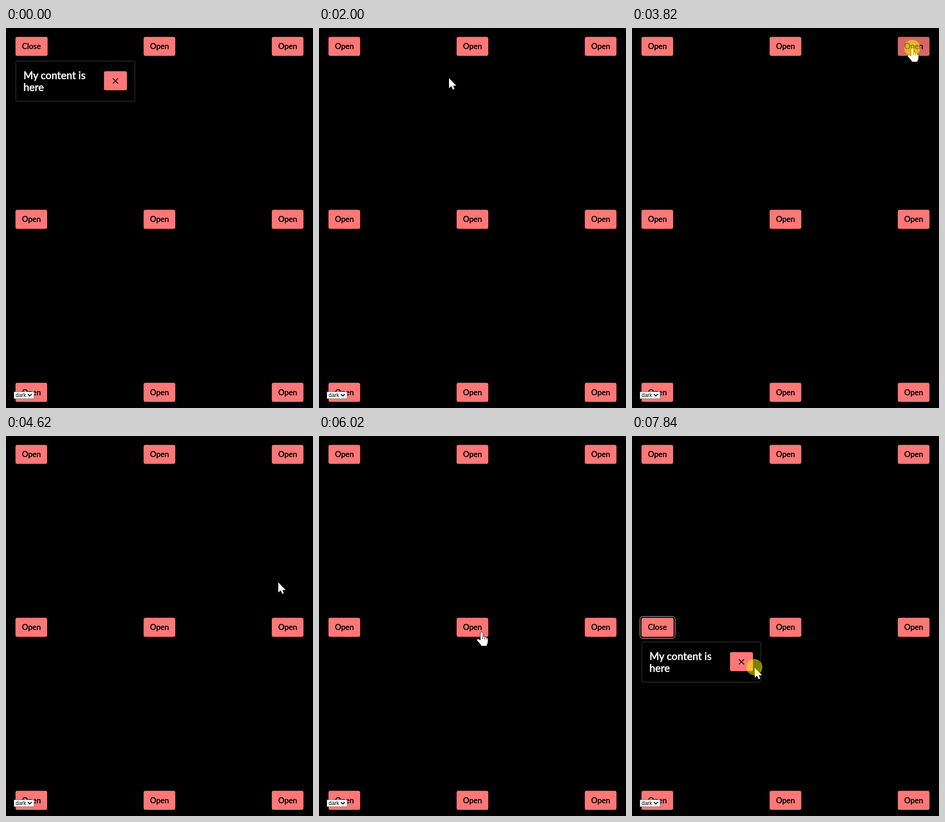
These frames come from a looping animation (673x833 px, 8 s). An HTML page:

```html
<!DOCTYPE html>
<html lang="en">
<head>
<meta charset="utf-8">
<title>Popover grid</title>
<style>
  html, body { margin: 0; width: 100%; height: 100%; overflow: hidden; background: #000; }
  svg { display: block; width: 673px; height: 833px; }
  text { font-family: Lato, sans-serif; font-weight: 500; }
  .label { font-size: 17px; text-anchor: middle; stroke: #000; stroke-width: .4; }
  .heading { font-size: 22.7px; fill: #fff; stroke: #fff; stroke-width: .6; }
  .choice { font: 12px "Liberation Sans", Arial, sans-serif; }
  .button { fill: #ff7777; }
  .ring { fill: none; stroke: #ddd; }
  .panel { fill: #000; stroke: #444; }
  .cursor { fill: #fff; stroke: #000; stroke-width: 1.5; paint-order: stroke; }
  .line { fill: none; stroke: #000; }
</style>
</head>
<body>
<svg id="stage" viewBox="0 0 673 833">
  <g id="grid"></g>
  <g id="select">
    <rect x="17.5" y="797.5" width="44" height="15" fill="#fff" stroke="#767676"/>
    <text class="choice" x="21" y="809">dark</text>
    <path class="line" d="M48 802.5l4.2 4.2 4.2-4.2" stroke-width="2"/>
  </g>
  <g id="popover">
    <rect class="panel" x=".5" y=".5" width="261" height="88" rx="3.5"/>
    <text class="heading" x="17.3" y="40">My content is</text>
    <text class="heading" x="17.3" y="66">here</text>
    <rect class="button" x="193.8" y="22.7" width="50.4" height="41.7" rx="4"/>
    <path class="line" d="M213.3 38.3l11.4 11.4m0-11.4l-11.4 11.4" stroke-width="1.7"/>
  </g>
  <g id="pointer">
    <path id="arrow" class="cursor" d="M0 0V22L5 17.500L8.500 25L12 23.500L9 16.500H16Z"/>
    <g id="hand">
      <path class="cursor" d="M-3 17V2Q-3-1-.5-1T2 2V9Q4.500 7 6.500 10Q9 8.500 10.500 11.500Q13 11 13 14V20Q13 24 10 29H-1Q-3 24-8 20L-11 16Q-9 13-6 15Z"/>
      <path class="line" d="M2 9V14M6.300 10V15M10.300 11.500V15"/>
    </g>
    <path id="beam" d="M-5-10Q0-10 0-7Q0-10 5-10M0-8V8M-5 10Q0 10 0 7Q0 10 5 10" fill="none" stroke="#fff" stroke-width="1.300"/>
    <circle id="click" cx="-.7" cy="-1.300" r="17.700" fill="#ff0" fill-opacity=".5"/>
  </g>
</svg>
<script>
const LOOP = 8000, STEP = 200;
const COLS = [20.8, 301.7, 582.7], ROWS = [19.4, 398.6, 777.7];
const BUTTON = { width: 69.4, height: 41.7 };
const PANEL_X = [21, 302, 390];
const byId = id => document.getElementById(id);
const mix = (a, b, k) => a + (b - a) * k;
const between = (p, q, kx, ky = kx) => [mix(p[0], q[0], kx), mix(p[1], q[1], ky)];

function make(tag, attrs, parent) {
  const node = document.createElementNS(byId('stage').namespaceURI, tag);
  for (const key in attrs) node.setAttribute(key, attrs[key]);
  return parent.appendChild(node);
}

const cells = ROWS.flatMap((y, row) => COLS.map((x, col) => {
  const { width, height } = BUTTON, grid = byId('grid');
  const ring = make('rect', { class: 'ring', x: x - 3.3, y: y - 3.1, height: height + 6.5, rx: 6.5 }, grid);
  const box = make('rect', { class: 'button', x, y, height, rx: 4 }, grid);
  const label = make('text', { class: 'label', x: x + width / 2 + .2, y: y + 26.8 }, grid);
  return { ring, box, label, panel: [PANEL_X[col], Math.round(y + 52.6)] };
}));

// Each visit: press a button, open its popover, click near the cross, move on.
const visits = [
  { start: 0, cell: 0, at: [150, 322] },
  { start: 1400, cell: 0, at: [68, 36], shade: .75, ring: 1 },
  { start: 2600, cell: 1, at: [351, 36], shade: .75, ring: .2 },
  { start: 3820, cell: 2, at: [615, 45], shade: .85, ring: 0, via: [597, 321] },
  { start: 5020, cell: 5, at: [614, 432], shade: .8, ring: .5 },
  { start: 6220, cell: 4, at: [355, 427], shade: .75, ring: .5 },
  { start: 7440, cell: 3, at: [66, 425], shade: .75, ring: 1 }
];

function stateAt(time) {
  const index = visits.findLastIndex(v => time >= v.start);
  const visit = visits[index], next = visits[index + 1] || visit;
  const { cell, at } = visit;
  const target = cells[cell].panel.map((v, i) => v + [248, 57][i]);
  const step = Math.floor((time - visit.start) / STEP);
  const opened = { open: cell, focus: cell, ring: index ? 1 : 0 };
  const press = v => ({ kind: 'hand', pos: v.at, down: true, over: v.cell, shade: v.shade, focus: v.cell, ring: v.ring });

  switch (step) {
    case 0: return index ? press(visit) : opened;
    case 1: {
      const kind = !index ? 'arrow' : cell % 3 === 2 ? 'hand' : 'beam';
      return { ...opened, kind, pos: between(at, target, .23, .7) };
    }
    case 2: return { ...opened, kind: 'arrow', pos: target, down: true };
    case 3: return { kind: 'arrow', pos: between(target, visit.via || next.at, .2) };
    case 4: return { kind: 'arrow', pos: visit.via || between(target, next.at, .65) };
    case 5: return { kind: 'hand', pos: [next.at[0] + 2, next.at[1] + 4], over: next.cell, shade: .98 };
    default: return index ? { kind: 'hand', pos: next.at, over: next.cell, shade: .95 } : press(next);
  }
}

const show = (node, visible) => { node.style.display = visible ? '' : 'none'; };

function draw(state) {
  cells.forEach((cell, i) => {
    const open = state.open === i, shade = state.over === i ? state.shade : 1;
    const width = BUTTON.width + (open ? 1 : 0);
    cell.label.textContent = open ? 'Close' : 'Open';
    cell.box.setAttribute('width', width);
    cell.ring.setAttribute('width', width + 6.6);
    cell.box.style.fill = `rgb(${255 * shade},${119 * shade},${119 * shade})`;
    cell.ring.style.opacity = state.focus === i ? state.ring : 0;
  });
  const open = cells[state.open];
  show(byId('popover'), open);
  if (open) byId('popover').setAttribute('transform', `translate(${open.panel})`);
  for (const kind of ['arrow', 'hand', 'beam']) show(byId(kind), state.kind === kind);
  show(byId('click'), state.down);
  if (state.pos) byId('pointer').setAttribute('transform', `translate(${state.pos.map(Math.round)})`);
}

const began = performance.now();
function tick() {
  draw(stateAt((performance.now() - began) % LOOP));
  requestAnimationFrame(tick);
}
tick();
</script>
</body>
</html>
```
